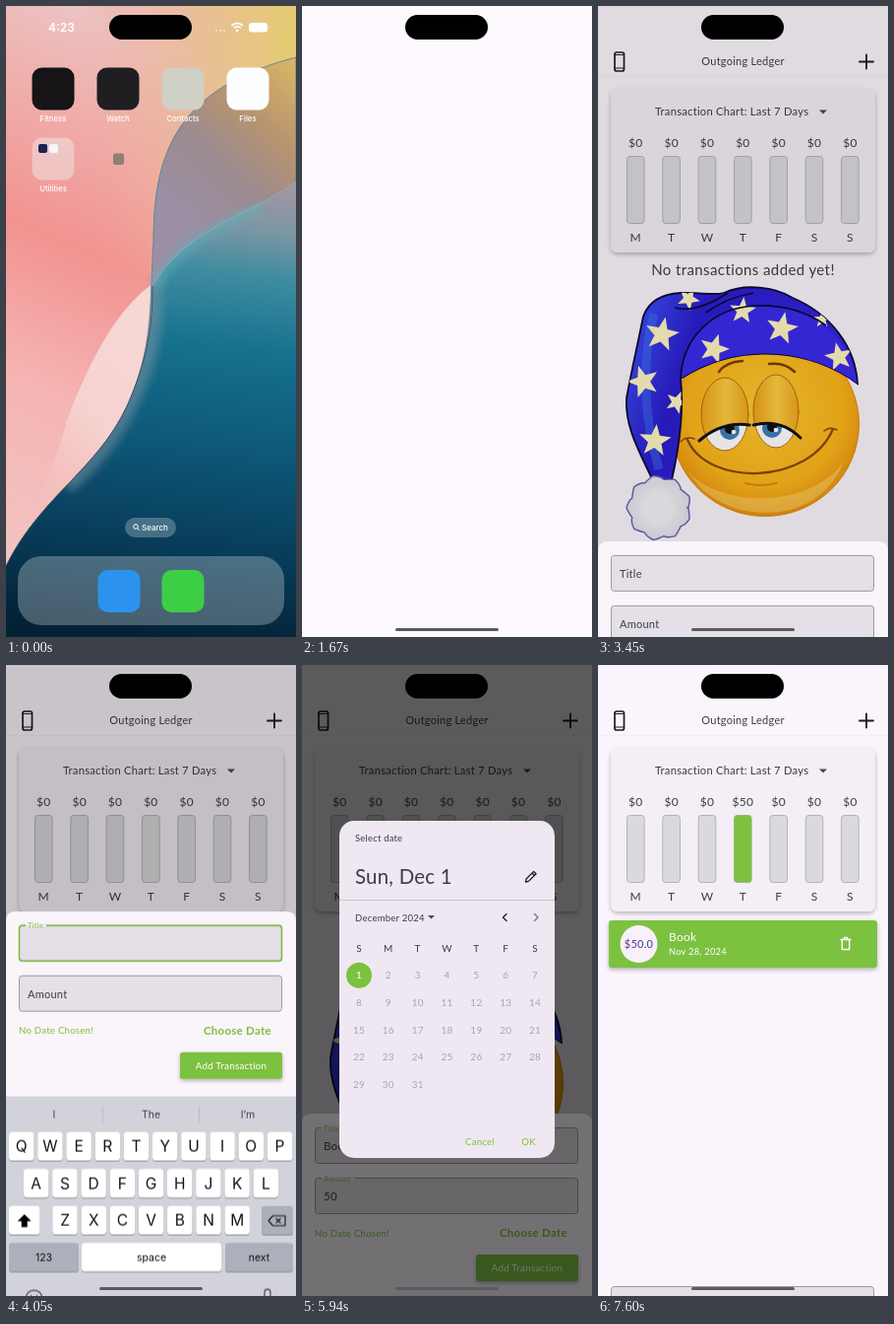
Animation, 295 px wide and 640 px high, one loop 8 s. Source, as an HTML page:

```html
<!DOCTYPE html>
<html lang="en">
<head>
<meta charset="utf-8">
<title>Outgoing Ledger</title>
<style>
html,body{margin:0;width:100%;height:100%;overflow:hidden;background:#fff}
svg{display:block}
text{font-family:Lato,"Open Sans",sans-serif;letter-spacing:.25px;fill:#3f3c42}
.ui text,text.ui{font-family:Inter,Roboto,sans-serif;letter-spacing:0}
.mid{text-anchor:middle}
.white,.white text{fill:#fff}
.green{fill:#7dc13f}
.line{fill:none;stroke:#1d1b20;stroke-linecap:round;stroke-linejoin:round}
.field{fill:#e5dfe8;stroke:#9d989f}
.focus{fill:none;stroke:#7dc13f;stroke-width:1.6}
.small{font-size:7.5px;fill:#8cc757}
.off{fill:#aaa4ad}

#icons,#launch,#app,#dim,#sheet,#keys,#picker,#months{animation:8s linear infinite}
#icons{animation-name:icons;transform-origin:114px 155px}
#launch{animation-name:launch}
#app{animation-name:app}
#dim{animation-name:dim}
#sheet{animation-name:sheet}
#keys{animation-name:keys}
#picker{animation-name:picker}
#months{animation-name:months}
@keyframes icons{
  0%,18.25%{transform:scale(1);opacity:1}
  20.5%,100%{transform:scale(1.3);opacity:0}
}
@keyframes launch{
  0%,18.25%{x:93px;y:134px;width:43px;height:43px;rx:10px;fill:#454545}
  19%{x:68px;y:88px;width:128px;height:200px;rx:20px;fill:#a5a2a6}
  20%{x:14px;y:18px;width:267px;height:584px;rx:34px;fill:#fdf9fe}
  20.875%,100%{x:0px;y:0px;width:295px;height:640px;rx:0px;fill:#fdf9fe}
}
@keyframes app{0%,31.875%{opacity:0}32.625%,100%{opacity:1}}
@keyframes dim{0%,42.875%{opacity:0}43.375%,93%{opacity:1}95%,100%{opacity:0}}
@keyframes sheet{
  0%,42.875%{transform:translateY(417px)}
  43.375%,49%{transform:translateY(232px)}
  49.5%{transform:translateY(180px)}
  50%{transform:translateY(92px)}
  50.625%{transform:translateY(27px)}
  51.25%{transform:translateY(9px)}
  52%,64.375%{transform:translateY(0)}
  65.625%,69.625%{transform:translateY(30px)}
  70.25%{transform:translateY(90px)}
  71%{transform:translateY(200px)}
  71.625%,93%{transform:translateY(232px)}
  93.75%{transform:translateY(285px)}
  94.5%{transform:translateY(365px)}
  95%,100%{transform:translateY(393px)}
}
@keyframes keys{
  0%,49%{transform:translateY(232px)}
  49.5%{transform:translateY(182px)}
  50%{transform:translateY(96px)}
  50.625%{transform:translateY(30px)}
  51.25%{transform:translateY(10px)}
  52%,69.625%{transform:translateY(0)}
  70.25%{transform:translateY(62px)}
  71%{transform:translateY(172px)}
  71.625%,100%{transform:translateY(232px)}
}
@keyframes picker{0%,71.75%{opacity:0}74.125%,89.75%{opacity:1}91%,100%{opacity:0}}
@keyframes months{
  0%,82.375%{transform:translateX(0);animation-timing-function:ease-in-out}
  84.5%,100%{transform:translateX(219px)}
}
</style>
</head>
<body>
<svg width="295" height="640">
<defs>
  <linearGradient id="pink" x1=".2" y1="0" x2="0" y2="1">
    <stop offset="0" stop-color="#ecc2c2"/><stop offset=".14" stop-color="#efb0ac"/>
    <stop offset=".36" stop-color="#f29391"/><stop offset=".6" stop-color="#f5b5b3"/>
    <stop offset=".9" stop-color="#f1c4c2"/>
  </linearGradient>
  <radialGradient id="sun" cx="1" cy=".05" r=".75" fx="1" fy=".05">
    <stop offset="0" stop-color="#e6cc70"/><stop offset=".4" stop-color="#e6c088" stop-opacity=".8"/>
    <stop offset="1" stop-color="#f0a79c" stop-opacity="0"/>
  </radialGradient>
  <linearGradient id="glass" gradientUnits="userSpaceOnUse" x1="295" y1="60" x2="165" y2="200">
    <stop offset="0" stop-color="#d8b468"/><stop offset=".35" stop-color="#b8946f"/>
    <stop offset=".65" stop-color="#9c8b8f"/><stop offset="1" stop-color="#9a8fa4"/>
  </linearGradient>
  <linearGradient id="sea" gradientUnits="userSpaceOnUse" x1="215" y1="175" x2="160" y2="640">
    <stop offset="0" stop-color="#a296a2"/><stop offset=".1" stop-color="#7b96a4"/>
    <stop offset=".2" stop-color="#3f8ca0"/><stop offset=".36" stop-color="#16718f"/>
    <stop offset=".6" stop-color="#0d5576"/><stop offset=".82" stop-color="#073a56"/><stop offset="1" stop-color="#042236"/>
  </linearGradient>
  <linearGradient id="band" x1=".7" y1="0" x2=".2" y2="1">
    <stop offset="0" stop-color="#f6d7d4"/><stop offset=".45" stop-color="#f6d2cf"/><stop offset=".85" stop-color="#f4c6c5" stop-opacity="0"/>
  </linearGradient>
  <radialGradient id="skin" cx=".5" cy=".42" r=".6">
    <stop offset="0" stop-color="#ffcb30"/><stop offset=".7" stop-color="#fcb51a"/>
    <stop offset="1" stop-color="#e88c0c"/>
  </radialGradient>
  <linearGradient id="lid">
    <stop offset="0" stop-color="#ee9d10"/><stop offset=".5" stop-color="#ffce42"/><stop offset="1" stop-color="#ee9d10"/>
  </linearGradient>
  <linearGradient id="cloth" x1="0" y1=".3" x2="1" y2=".6">
    <stop offset="0" stop-color="#3a4cf2"/><stop offset=".25" stop-color="#2c1dcf"/><stop offset="1" stop-color="#3427e2"/>
  </linearGradient>
  <radialGradient id="fluff"><stop offset=".4" stop-color="#f4f3f7"/><stop offset="1" stop-color="#e2dfea"/></radialGradient>
  <filter id="shade" x="-10%" y="-10%" width="120%" height="130%"><feDropShadow dx="0" dy="2" stdDeviation="2" flood-opacity=".28"/></filter>
  <filter id="soft" x="-30%" y="-30%" width="160%" height="160%"><feGaussianBlur stdDeviation="5"/></filter>
  <clipPath id="seaClip"><use href="#water"/></clipPath>
  <clipPath id="hatClip"><use href="#hat"/></clipPath>
  <clipPath id="leftEye"><ellipse cx="129" cy="414" rx="24" ry="37"/></clipPath>
  <clipPath id="rightEye"><ellipse cx="181" cy="411" rx="23" ry="37"/></clipPath>
  <clipPath id="page"><rect x="38" y="272" width="219" height="172"/></clipPath>
</defs>

<!-- home screen -->
<rect width="295" height="640" fill="url(#pink)"/>
<rect width="295" height="640" fill="url(#sun)"/>
<path d="M150 281C112 308 86 358 62 420C50 470 20 530 0 566L60 560L150 400Z" fill="url(#band)"/>
<path d="M0 568C38 492 100 468 129 392C150 338 146 300 150 240C150 150 172 84 295 52V640H0Z" fill="url(#glass)" stroke="#5c8b95"/>
<path id="water" d="M295 179C240 215 182 228 149 284C149 320 146 348 129 392C100 468 38 492 0 568V640H295Z" fill="url(#sea)"/>
<g clip-path="url(#seaClip)" fill="none">
  <path d="M149 270C150 330 146 355 129 392C112 432 90 460 60 486" stroke="#7f95a2" stroke-width="20" opacity=".55" filter="url(#soft)"/>
</g>
<path d="M260 203C220 225 180 236 151 284" fill="none" stroke="#5fb2bd" stroke-width="9" opacity=".6" filter="url(#soft)"/>
<path d="M149 284C149 320 146 348 129 392C100 468 38 492 0 568" fill="none" stroke="#2c4c5c" stroke-width=".8"/>
<path d="M295 179C240 215 182 228 149 284" fill="none" stroke="#7fc0c8" stroke-opacity=".6"/>
<g id="icons" class="ui">
  <g id="tiles"></g>
  <rect data-show="0 1440" x="109" y="149.500" width="11" height="11.500" rx="2" fill="#8f7f77"/>
  <g data-show="1440 8000">
    <rect x="93" y="134" width="43" height="43" rx="10" fill="#454545"/>
    <text x="114" y="187.500" class="mid white" font-size="7.600" font-weight="500">Outgoing Ledger</text>
  </g>
  <rect x="121" y="519" width="52" height="20" rx="10" fill="#fff" fill-opacity=".25"/>
  <circle cx="132" cy="528" r="2.300" fill="none" stroke="#fff"/><path d="M133.700 529.700l2 2" stroke="#fff"/>
  <text x="138" y="532" class="white" font-size="8" font-weight="500">Search</text>
  <rect x="12" y="558" width="271" height="70" rx="24" fill="#fff" fill-opacity=".27"/>
  <rect x="93.500" y="572" width="43" height="43" rx="10" fill="#2b93ee"/>
  <rect x="158.500" y="572" width="43" height="43" rx="10" fill="#3ccf46"/>
  <text x="43" y="26" class="white" font-size="12" font-weight="600">4:23</text>
  <g fill="#fff"><circle cx="214" cy="25" r=".8"/><circle cx="218" cy="25" r=".8"/><circle cx="222" cy="25" r=".8"/>
    <rect x="247" y="17" width="19" height="9.500" rx="3"/><path d="M267 20v3.500q1.500-1.700 0-3.500"/></g>
  <path d="M229.500 20q5.700-5 11.400 0M231.600 22.300q3.600-3 7.200 0" fill="none" stroke="#fff" stroke-width="1.700"/>
  <circle cx="235.200" cy="24.800" r="1.500" fill="#fff"/>
</g>

<g data-show="1460 8000"><rect id="launch"/></g>

<!-- app -->
<g id="app">
  <rect width="295" height="640" fill="#faf5fc"/>
  <rect y="71" width="295" height="1" fill="#f2ecf4"/>
  <rect x="17" y="47" width="9.500" height="19" rx="2" class="line" stroke-width="1.700"/>
  <path d="M17 49.500h9.500M17 63h9.500" class="line" stroke-width="1.200"/>
  <text x="147.500" y="60" class="mid" font-size="11">Outgoing Ledger</text>
  <path d="M266 56.500h14M273 49.500v14" class="line" stroke-width="1.800"/>
  <rect x="13" y="84" width="269" height="166" rx="7" fill="#f4eef6" filter="url(#shade)"/>
  <text x="58" y="111" font-size="11.200">Transaction Chart: Last 7 Days</text>
  <path d="M225 105.500h8l-4 4z" fill="#4a474d"/>
  <g id="chart" class="mid" font-size="12"></g>

  <g data-show="0 7450">
    <text x="147.500" y="273" class="mid" font-size="15" style="letter-spacing:.4px">No transactions added yet!</text>
    <ellipse cx="170" cy="424" rx="95.500" ry="93.500" fill="url(#skin)" stroke="#d98a12"/>
    <path d="M92 472C122 508 215 512 250 462C234 502 200 514 170 514S108 500 92 472Z" fill="#ffe07a" opacity=".45"/>
    <g clip-path="url(#leftEye)">
      <rect x="100" y="370" width="60" height="85" fill="#fff"/>
      <circle cx="134" cy="430" r="10" fill="#3f7fb8"/><circle cx="134" cy="429" r="5" fill="#111"/><circle cx="138" cy="432" r="2.300" fill="#fff"/>
      <path d="M100 370H160V425Q128 420 100 441Z" fill="url(#lid)"/>
    </g>
    <g clip-path="url(#rightEye)">
      <rect x="155" y="370" width="60" height="85" fill="#fff"/>
      <circle cx="177" cy="428" r="10" fill="#3f7fb8"/><circle cx="177" cy="427" r="5" fill="#111"/><circle cx="181" cy="430" r="2.300" fill="#fff"/>
      <path d="M155 370H210V438Q186 418 155 425Z" fill="url(#lid)"/>
    </g>
    <g fill="none" stroke="#b56a0c" stroke-linecap="round">
      <ellipse cx="129" cy="414" rx="24" ry="37"/><ellipse cx="181" cy="411" rx="23" ry="37"/>
      <path d="M103 441Q126 421 154 425M158 425Q186 418 206 438" stroke="#111" stroke-width="3"/>
      <path d="M123 371Q130 361 147 360M174 363Q190 361 200 371" stroke="#7a3f08" stroke-width="2.500"/>
      <path d="M91 440C112 488 215 486 239 429" stroke="#8a4a08" stroke-width="2.200"/>
      <path d="M84 442Q90 436 98 439M230 431Q236 426 243 430" stroke="#8a4a08" stroke-width="1.500"/>
      <path d="M150 484Q165 488 182 484" stroke="#d98a12" stroke-width="2"/>
    </g>
    <path id="hat" d="M84 378C88 415 82 450 75 481L56 482C44 455 27 428 29 398C34 370 40 345 46 315C52 298 66 292 84 291C104 290 116 294 128 291C150 281 180 285 198 296C236 312 262 345 264 383C222 352 150 336 84 378Z" fill="url(#cloth)" stroke="#0b0930" stroke-width="1.800"/>
    <g clip-path="url(#hatClip)">
      <path d="M84 378C86 335 118 306 160 304C215 302 258 335 264 384C222 352 150 336 84 378Z" fill="#3a2bec"/>
      <path d="M57 312C46 352 44 410 62 470" fill="none" stroke="#3f78f5" stroke-width="9" opacity=".45"/>
      <g id="stars" fill="#fff5c0"></g>
    </g>
    <path d="M84 378C86 335 118 306 160 304C192 303 214 311 232 324M78 306Q100 312 132 291M110 311Q130 296 158 291" fill="none" stroke="#0b0930" stroke-width="1.600"/>
    <path id="pompom" fill="url(#fluff)" stroke="#6461ae" stroke-width="1.400"/>
  </g>

  <g data-show="7450 8000">
    <rect x="11" y="259" width="273" height="48" rx="3" class="green" filter="url(#shade)"/>
    <circle cx="41.500" cy="283" r="19" fill="#f8f1fa"/>
    <text x="41.500" y="287" class="mid" font-size="11" style="fill:#4f378b">$50.0</text>
    <text x="72" y="280" font-size="12" class="white">Book</text>
    <text x="72" y="294" font-size="9.300" class="white">Nov 28, 2024</text>
    <path d="M247 278.500h10M250 278l.5-1.500h3l.5 1.500M248.300 279v9.500h7.400V279" class="line" style="stroke:#fff" stroke-width="1.400"/>
  </g>
</g>
<rect id="dim" width="295" height="640" fill="#000" fill-opacity=".2"/>

<!-- entry form -->
<g id="sheet">
  <path d="M0 640V233q0-10 10-10H285q10 0 10 10V640Z" fill="#faf4fb"/>
  <rect x="13.500" y="237.500" width="267" height="36" rx="3" class="field"/>
  <rect x="13.500" y="288.500" width="267" height="36" rx="3" class="field"/>
  <rect data-show="3930 5150" x="13.500" y="237.500" width="267" height="36" rx="3" class="focus"/>
  <rect data-show="5150 5580" x="13.500" y="288.500" width="267" height="36" rx="3" class="focus"/>
  <text data-show="0 3930" x="22" y="260" font-size="11">Title</text>
  <g data-show="3930 7590"><rect x="20" y="236" width="21" height="3" fill="#f0eaf2"/><text x="22" y="240.500" class="small">Title</text></g>
  <text data-show="0 5150" x="22" y="311" font-size="11">Amount</text>
  <g data-show="5150 8000"><rect x="20" y="287" width="34" height="3" fill="#f0eaf2"/><text x="22" y="291.500" class="small">Amount</text></g>
  <g id="typed" font-size="11.500"></g>
  <text data-show="0 7200" x="13" y="347.500" font-size="9.600" class="green">No Date Chosen!</text>
  <text data-show="7200 8000" x="13" y="347.500" font-size="9.600" class="green">Nov 28, 2024</text>
  <text x="201" y="348" font-size="11.500" font-weight="700" class="green">Choose Date</text>
  <rect x="177" y="366" width="104" height="27" rx="2.500" class="green" filter="url(#shade)"/>
  <text x="229" y="383" font-size="9.800" class="mid white">Add Transaction</text>
</g>

<!-- keyboard -->
<g id="keys" class="ui mid">
  <g data-show="3900 5200">
    <rect y="408" width="295" height="232" fill="#d2d3da"/>
    <path d="M98.500 418v16M196.500 418v16" stroke="#bcbec5"/>
    <g id="hints" font-size="10.500"></g>
    <g id="letters"></g>
    <g class="line" stroke-width="1.300" style="stroke:#55565c">
      <circle cx="28.500" cy="613" r="8.500"/><path d="M23.500 614.500q5 6 10 0zM25.500 610v1M31.500 610v1"/>
      <rect x="263" y="603.500" width="6" height="12" rx="3"/><path d="M260 611.500q0 7 6 7t6-7M266 618.500v4M263 622.500h6"/>
    </g>
  </g>
  <g data-show="5200 8000">
    <rect y="438" width="295" height="202" fill="#d2d3da"/>
    <g id="digits"></g>
  </g>
</g>

<!-- date picker -->
<g id="picker">
  <rect width="295" height="640" fill="#000" fill-opacity=".54"/>
  <rect x="38" y="158" width="219" height="342" rx="15" fill="#efe8f2"/>
  <text x="54" y="179" font-size="9.400">Select date</text>
  <text data-show="0 7140" x="54" y="222" font-size="20.400">Sun, Dec 1</text>
  <text data-show="7140 8000" x="54" y="222" font-size="20.400">Thu, Nov 28</text>
  <path d="M227.500 220l.6-3 7.600-7.600 2.400 2.400-7.600 7.600zM234 211l2.400 2.400" class="line" stroke-width="1.300"/>
  <path d="M38 238.500h219" stroke="#c9c3cc"/>
  <text data-show="0 6680" x="54" y="259.500" font-size="9.500">December 2024</text>
  <text data-show="6680 8000" x="54" y="259.500" font-size="9.500">November 2024</text>
  <path d="M128 254h7l-3.500 3.600z" fill="#4a474d"/>
  <path d="M208 252.500l-3.500 3.500 3.500 3.500" class="line" stroke-width="1.300"/>
  <path d="M236.500 252.500l3.500 3.500-3.500 3.500" class="line" stroke-width="1.300" style="stroke:#77727a"/>
  <g clip-path="url(#page)"><g id="months" class="mid" font-size="10"></g></g>
  <text x="181" y="487" font-size="9.600" class="mid green">Cancel</text>
  <text x="230.500" y="487" font-size="9.600" class="mid green">OK</text>
</g>

<rect data-show="1670 8000" x="95" y="631" width="105" height="3" rx="1.500" fill="#5c5a5f"/>
<rect x="105" y="9" width="84" height="25" rx="12.500"/>
</svg>
<script>
const LOOP = 8000;
const fill = (id, html) => document.getElementById(id).innerHTML = html;
const list = (items, fn) => [...items].map(fn).join('');
const label = (x, y, s, attrs = '') => `<text x="${x}" y="${y}" ${attrs}>${s}</text>`;

// home tiles
const tiles = [['Fitness', '#161416'], ['Watch', '#1f1f21'], ['Contacts', '#cfd0c6'], ['Files', '#fcfdff'], ['Utilities', '#eedcdc']];
fill('tiles', list(tiles, ([name, color], i) => {
  const x = 48 + 66 * (i % 4), y = i < 4 ? 84 : 155;
  return `<rect x="${x - 21.5}" y="${y - 21.5}" width="43" height="43" rx="10" fill="${color}" fill-opacity="${i < 4 ? 1 : .6}"/>` +
    label(x, y + 32.5, name, 'class="mid white" font-size="7.8" font-weight="500"');
}) + '<rect x="33" y="140" width="9" height="9" rx="2" fill="#1b2350"/><rect x="44" y="140" width="9" height="9" rx="2" fill="#f4f6fa"/>');

// week chart
fill('chart', list('MTWTFSS', (day, i) => {
  const x = 38.3 + 36.35 * i;
  const bar = color => `<rect x="${x - 8.8}" y="152.5" width="17.6" height="68" rx="3" ${color}/>`;
  const paid = i === 3;
  return bar('fill="#dadadd" stroke="#b4b2b6"') +
    (paid ? `<g data-show="7450 8000">${bar('class="green"')}${label(x, 143, '$50')}</g>` : '') +
    label(x, 143, '$0', paid ? 'data-show="0 7450"' : '') + label(x, 239, day);
}));

// nightcap
const star = ([x, y, r, turn]) => {
  const pts = Array.from({length: 10}, (_, k) => {
    const a = turn + k * Math.PI / 5, q = k % 2 ? r * .42 : r;
    return `${(x + q * Math.sin(a)).toFixed(1)},${(y - q * Math.cos(a)).toFixed(1)}`;
  });
  return `<polygon points="${pts.join(' ')}"/>`;
};
fill('stars', list([[65, 333, 18, .2], [46, 381, 17, -.3], [58, 441, 17, .1], [92, 297, 12, .5], [118, 348, 16, .3],
  [147, 309, 14, .1], [187, 327, 17, .2], [245, 356, 15, -.2], [80, 402, 12, .4], [228, 318, 9, 0]], star));

const rim = (k, r) => {
  const a = k * Math.PI / 9;
  return `${(62 + r * Math.cos(a)).toFixed(1)} ${(509 + r * Math.sin(a)).toFixed(1)}`;
};
let tuft = `M${rim(0, 30)}`;
for (let k = 1; k <= 18; k++) tuft += `Q${rim(k - .3, 32)} ${rim(k, k % 2 ? 33 : 29)}`;
document.getElementById('pompom').setAttribute('d', tuft + 'Z');

// typed text: from, to, y, text, caret
const typed = [[4350, 4480, 260, 'B', 1], [4480, 4610, 260, 'Bo', 1], [4610, 4800, 260, 'Boo', 1], [4800, 5150, 260, 'Book', 1],
  [5150, 8000, 260, 'Book', 0], [5360, 5490, 311, '5', 1], [5490, 5580, 311, '50', 1], [5580, 8000, 311, '50', 0]];
fill('typed', list(typed, ([a, b, y, s, caret]) =>
  label(22, y, s + (caret ? '<tspan class="green" font-size="15" dx="-2">|</tspan>' : ''), `data-show="${a} ${b}"`)));

// keyboard
const key = (x, y, w, s, size, gray) =>
  `<rect x="${x}" y="${y + 1}" width="${w}" height="29" rx="3.6" fill="#8c8e94"/>` +
  `<rect x="${x}" y="${y}" width="${w}" height="29" rx="3.6" fill="${gray ? '#abb0bb' : '#fff'}"/>` +
  label(x + w / 2, y + 14.5 + size * .36, s, `font-size="${size}" style="fill:#111"`);
const row = (s, x, y, size) => list(s, (c, i) => key(x - 12.7 + 29.2 * i, y, 25.4, c, size));
const rows = [['qwertyuiop', 15.7, 444], ['asdfghjkl', 30.7, 481.5], ['zxcvbnm', 60, 519]];
const arrow = 'M18.700 527.500l-7 7h4v6h6v-6h4z';
const erase = '<path d="M267 534l4.500-5h12.500v10h-12.500zM275 532l4 4M279 532l-4 4" class="line" stroke-width="1.200"/>';
fill('letters',
  `<g data-show="0 4350">${list(rows, ([s, x, y]) => row(s.toUpperCase(), x, y, 15.5))}${key(3, 519, 31.5, '', 10)}<path d="${arrow}"/></g>` +
  `<g data-show="4350 8000">${list(rows, ([s, x, y]) => row(s, x, y, 16.5))}${key(3, 519, 31.5, '', 10, 1)}<path d="${arrow}" class="line" stroke-width="1.200"/></g>` +
  key(260, 519, 32, '', 10, 1) + erase +
  key(3, 556.5, 71, '123', 10.5, 1) + key(77, 556.5, 142, 'space', 10.5) + key(223, 556.5, 69, 'next', 10.5, 1));

const hints = [[0, 4350, 'I', 'The', 'I’m'], [4350, 4480, '“B”', 'But', 'By'], [4480, 4610, '“Bo”', 'Both', 'Box'],
  [4610, 4800, '“Boo”', 'Book', 'Boot'], [4800, 8000, '“Book”', 'Booked', 'Books']];
fill('hints', list(hints, ([a, b, ...words]) =>
  `<g data-show="${a} ${b}">${list(words, (w, i) => label(49 + 98.5 * i, 430, w))}</g>`));

fill('digits', list('123456789.0', (c, i) =>
  key(3 + 97.5 * (i % 3), 444 + 37.5 * (i / 3 | 0), 94, c, 16, c === '.')) +
  `<g transform="translate(-31 37.500)">${erase}</g>`);

// calendar pages
const month = (left, first, count, chosen, isOpen) => {
  const spot = d => [left + 58 + 29.85 * ((d - 1 + first) % 7), 314.7 + 27.6 * ((d - 1 + first) / 7 | 0)];
  const [cx, cy] = spot(chosen);
  return list('SMTWTFS', (c, i) => label(left + 58 + 29.85 * i, 291, c)) +
    list(Array(count), (_, i) => {
      const [x, y] = spot(i + 1);
      return label(x, y + 3.6, i + 1, isOpen ? '' : 'class="off"');
    }) +
    `<g ${isOpen ? 'data-show="6940 8000"' : ''}><circle cx="${cx}" cy="${cy}" r="13" class="green"/>${label(cx, cy + 3.6, chosen, 'class="white"')}</g>`;
};
fill('months', month(0, 0, 31, 1, false) + month(-219, 5, 30, 28, true));

// hard cuts: data-show="from to" in ms
const css = list(document.querySelectorAll('[data-show]'), (el, i) => {
  const [a, b] = el.dataset.show.split(' ').map(Number);
  const at = (t, v) => `${t * 100 / LOOP}%{opacity:${v}}`;
  el.style.animation = `show${i} ${LOOP}ms step-end infinite`;
  return `@keyframes show${i}{${a ? at(0, 0) : ''}${at(a, 1)}${b < LOOP ? at(b, 0) + at(LOOP, 0) : ''}}`;
});
document.head.append(Object.assign(document.createElement('style'), {textContent: css}));
</script>
</body>
</html>
```
